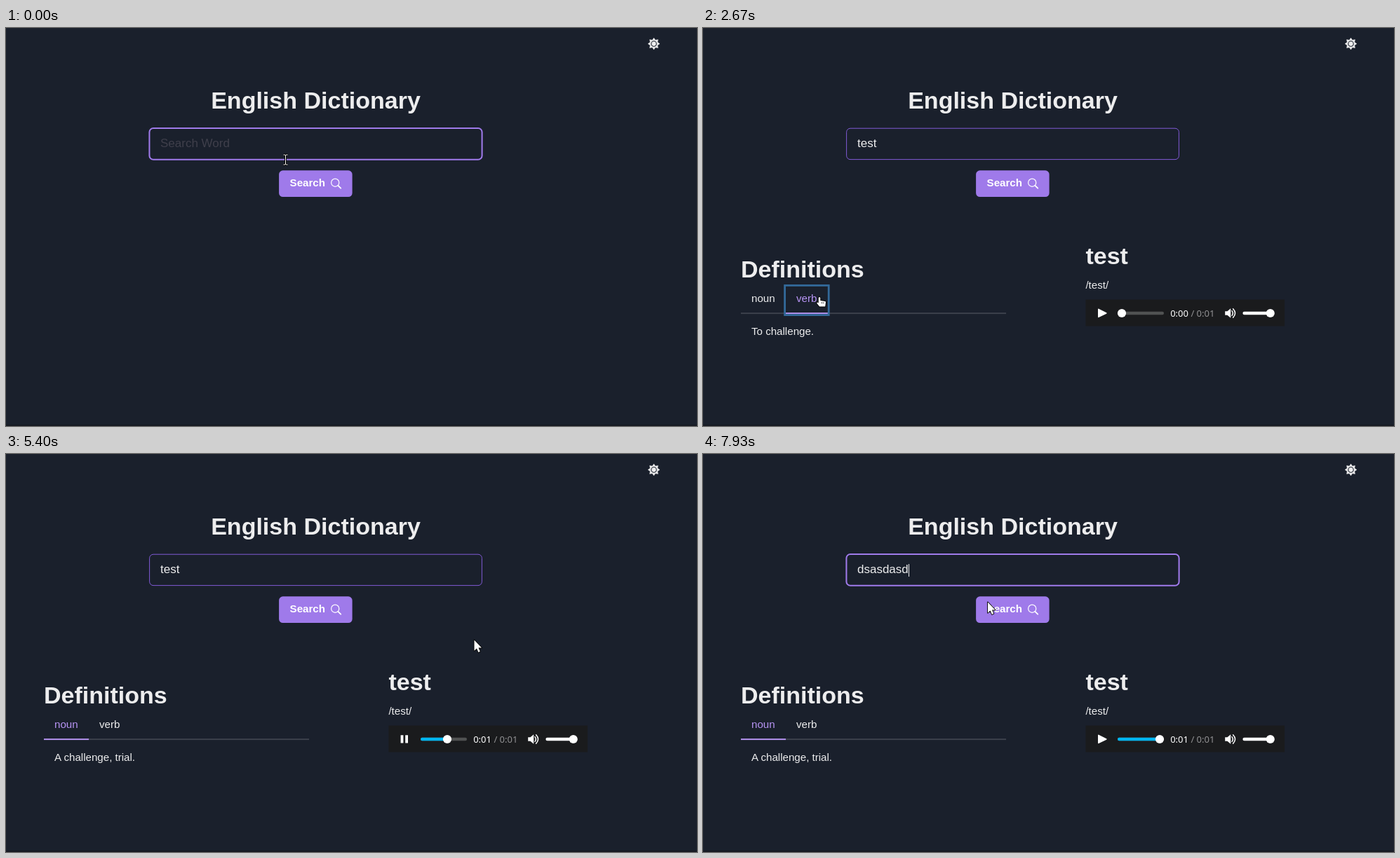
An HTML page for the animation above (8000 ms loop, 985 by 568 pixels).

```html
<!DOCTYPE html>
<html lang="en">
<head>
<meta charset="utf-8">
<title>English Dictionary</title>
<style>
  html, body { margin: 0; width: 100%; height: 100%; overflow: hidden; background: #1a202c; }
  svg { display: block; width: 100%; height: 100%; }
  text { font: 15.12px "Liberation Sans", Arial, sans-serif; fill: #ededee; white-space: pre; }
  .heading { font-size: 34.02px; font-weight: 700; }
  .field { font-size: 17.01px; }
  .clock { font: 13px "Noto Sans", "Open Sans", sans-serif; fill: #fff; }
  .clock.total { fill: #919193; }
  .bold { font-weight: 700; fill: #fff; }
  #placeholder { fill: #3f3f4b; }
  .ring { fill: none; stroke: #326999; stroke-width: 2.8; }
</style>
</head>
<body>
<svg viewBox="0 0 985 568">
  <defs>
    <g id="arrow">
      <path d="M0 0V15.2L3.5 12 5.9 17.4 8.3 16.3 6 11.1H10.5Z" fill="#fff" stroke="#000" stroke-width="1.8" stroke-linejoin="round" paint-order="stroke"/>
    </g>
    <g id="beam" fill="none">
      <path id="stem" d="M-3-7H-1.2Q0-7 0-6V6Q0 7-1.2 7H-3M3-7H1.2Q0-7 0-6M0 6Q0 7 1.2 7H3" stroke="#000" stroke-width="3"/>
      <path d="M-3-7H-1.2Q0-7 0-6V6Q0 7-1.2 7H-3M3-7H1.2Q0-7 0-6M0 6Q0 7 1.2 7H3" stroke="#fff"/>
    </g>
    <g id="hand">
      <path d="M-1.3 1Q0-.8 1.3 1V5L8 6Q9.2 6.3 9 7.8L8.2 13.5H0L-3.6 9Q-4.2 7.5-2.8 7.4L-1.3 8.6Z" fill="#fff" stroke="#000" stroke-width="1.8" stroke-linejoin="round" paint-order="stroke"/>
      <path d="M3.4 7V9.4M5.7 7.2V9.4" stroke="#000" stroke-width=".7"/>
    </g>
  </defs>

  <rect width="985" height="568" fill="#1a202c"/>
  <rect y="566" width="985" height="2" fill="#161a22"/>

  <g transform="translate(923.5 22.5)" fill="#ededee">
    <path id="rays" stroke="#ededee" stroke-width=".6" stroke-linejoin="round"/>
    <circle r="3.7" fill="none" stroke="#1a202c" stroke-width="1.1"/>
  </g>

  <text class="heading" x="441.5" y="114.9" text-anchor="middle">English Dictionary</text>
  <rect id="border" x="204.6" y="143.2" width="473.8" height="44.4" rx="5.4" fill="none" stroke-width="1"/>
  <rect id="glow" x="204.4" y="143" width="474.2" height="44.8" rx="5.6" fill="none" stroke="#9f7aea" stroke-width="2"/>
  <rect id="selection" y="156.5" height="18.5" fill="#3584e4"/>
  <text id="placeholder" class="field" x="220" y="169.6">Search Word</text>
  <text id="query" class="field" x="220" y="169.6"></text>
  <rect id="caret" y="157" width="1" height="18" fill="#ededee"/>

  <rect x="389.1" y="203.3" width="104.5" height="37.8" rx="5.6" fill="#9f7aea"/>
  <text class="bold" x="404.6" y="226">Search</text>
  <g fill="none" stroke="#fff">
    <circle cx="469.2" cy="220.7" r="5.6" stroke-width="1.2"/>
    <path d="M473.4 224.9L477.2 228.7" stroke-width="1.8" stroke-linecap="round"/>
  </g>

  <g id="results">
    <text class="heading" x="54" y="355.8">Definitions</text>
    <rect x="54" y="406.2" width="378" height="1.9" fill="#3e424d"/>
    <rect id="nounLine" x="54" y="406.2" width="64" height="1.9" fill="#b794f4"/>
    <rect id="verbLine" x="118" y="406.2" width="60" height="1.9" fill="#b794f4"/>
    <text id="nounTab" x="69" y="391">noun</text>
    <text id="verbTab" x="133" y="391">verb</text>
    <rect id="nounRing" class="ring" x="52.6" y="367.4" width="66.6" height="42.2"/>
    <rect id="verbRing" class="ring" x="116.6" y="367.4" width="62.6" height="42.2"/>
    <text id="meaning" x="69" y="438.4"></text>

    <text class="heading" x="545.4" y="337">test</text>
    <text x="545.4" y="372">/test/</text>
    <rect x="545.5" y="387.6" width="283.5" height="37.8" fill="#1a1b1d"/>
    <g id="player" fill="#fff">
      <path id="play" d="M563.8 401.4L574.8 407 563.8 412.4Z" stroke-width="1.6" stroke-linejoin="round"/>
      <path id="pause" d="M562.6 401.2h3.8v11.2h-3.8zM569.2 401.2h3.8v11.2h-3.8z"/>
      <rect x="591" y="404.8" width="66" height="4.4" rx="2.2" fill="#505252"/>
      <rect id="progress" x="591" y="404.8" height="4.4" rx="2.2" fill="#00b6f0"/>
      <circle id="thumb" cy="407" r="6.1"/>
      <text id="elapsed" class="clock" x="666.2" y="411.8"></text>
      <text id="total" class="clock total" x="695.4" y="411.8">/ 0:01</text>
      <path d="M744.2 404.2h3.2l4.8-4v13.6l-4.8-4h-3.2z"/>
      <path d="M754 403.6q2.6 3.4 0 6.8M755.6 400.8q5.8 6.2 0 12.4" fill="none" stroke="#fff" stroke-width="1.5" stroke-linecap="round"/>
      <rect x="769.4" y="404.8" width="44" height="4.4" rx="2.2"/>
      <circle cx="808.7" cy="407" r="6.1"/>
    </g>
  </g>
  <use id="pointer"/>
</svg>
<script>
const LOOP = 8000;
const ui = {};
document.querySelectorAll('[id]').forEach(node => ui[node.id] = node);

// Held steps: [start, value...]
const POINTER = [
  [0, 'beam', 398.5, 188],
  [1800, 'arrow', 342, 226], [1865, 'arrow', 245, 290], [1930, 'arrow', 189, 325],
  [2065, 'arrow', 163, 355], [2130, 'hand', 160, 377], [2265, 'hand', 166, 384],
  [2800, 'hand', 158, 384], [2930, 'hand', 135, 385], [3000, 'hand', 112, 385],
  [3065, 'hand', 100, 386], [3200, 'hand', 96, 386],
  [3865, 'arrow', 230, 392], [3930, 'arrow', 400, 396], [4000, 'arrow', 530, 400],
  [4065, 'arrow', 566.5, 402],
  [5065, 'arrow', 574, 392], [5130, 'arrow', 590, 362], [5200, 'arrow', 612, 330],
  [5265, 'arrow', 640, 295], [5330, 'arrow', 660, 273], [5395, 'arrow', 667.5, 265.5],
  [5530, 'arrow', 680, 256], [5665, 'arrow', 688, 250], [5800, 'arrow', 690, 248],
  [5930, 'arrow', 672, 205], [6000, 'beam', 655, 178], [6130, 'beam', 642, 164],
  [6330, 'arrow', 710, 146], [6395, 'arrow', 776, 111], [6465, 'arrow', 690, 146],
  [6530, 'beam', 420, 160], [6665, 'beam', 290, 165], [6730, 'beam', 256, 166],
  [6865, 'beam', 240, 168], [6930, 'beam', 200, 178], [7000, 'beam', 152, 192],
  [7065, 'beam', 124, 203], [7130, 'beam', 161, 203],
  [7665, 'arrow', 215, 205], [7730, 'arrow', 285, 210], [7800, 'arrow', 355, 212],
  [7925, 'arrow', 406, 211.5]
];
const QUERY = [
  [0, ''], [195, 't'], [265, 'te'], [465, 'tes'], [665, 'test'],
  [7595, 'd'], [7665, 'dsa'], [7730, 'dsas'], [7800, 'dsasda'], [7925, 'dsasdasd']
];
const THUMB = [[0, 597], [4865, 609], [5130, 619], [5395, 629], [5665, 640], [5930, 651]];

// Eased ramps: [time, amount]
const FOCUS = [[0, 1], [2430, 1], [2620, 0], [6850, 0], [7020, 1]];
const HOVER = [[5900, 0], [6100, 1], [6340, 1], [6400, .8], [6470, .55], [6530, .65], [6730, 1], [6850, 1], [6950, 0]];
const VERB = [[2430, 0], [2620, 1], [3440, 1], [3630, 0]];
const NOUN = [[1000, 0], [1190, 1], [2430, 1], [2620, 0], [3440, 0], [3630, 1]];
const VERB_RING = VERB;
const NOUN_RING = [[3440, 0], [3630, 1], [4380, 1], [4540, 0]];
const PLAYER = [[1000, 0], [1260, 1]];

const held = (steps, t) => steps.findLast(step => step[0] <= t);
const within = (t, from, to) => t >= from && t < to;
const show = (node, on) => node.style.visibility = on ? 'inherit' : 'hidden';

function ramp(steps, t) {
  const next = steps.findIndex(step => step[0] > t);
  if (next === 0) return steps[0][1];
  if (next < 0) return steps.at(-1)[1];
  const [t0, a] = steps[next - 1], [t1, b] = steps[next];
  return a + (b - a) * (t - t0) / (t1 - t0);
}

function mix(from, to, amount) {
  return `rgb(${from.map((c, i) => Math.round(c + (to[i] - c) * amount))})`;
}

function set(node, attributes) {
  for (const name in attributes) node.setAttribute(name, attributes[name]);
}

function drawInput(t) {
  const [, text] = held(QUERY, t);
  ui.query.textContent = text;
  show(ui.placeholder, !text);
  const end = text ? 220 + ui.query.getComputedTextLength() : 220;
  set(ui.caret, { x: Math.round(end) });
  show(ui.caret, within(t, 195, 1330) || t >= 7595);

  const left = t < 6925 ? 234 : 220;
  set(ui.selection, { x: left, width: Math.max(0, end - left) });
  show(ui.selection, within(t, 6865, 7595));

  set(ui.border, { stroke: mix([128, 90, 213], [78, 80, 96], ramp(HOVER, t)) });
  set(ui.glow, { opacity: ramp(FOCUS, t) });
}

function drawTab(name, selected, ring) {
  set(ui[name + 'Line'], { opacity: selected });
  set(ui[name + 'Ring'], { opacity: ring });
  ui[name + 'Tab'].style.fill = mix([237, 237, 238], [183, 148, 244], selected);
}

function drawPlayer(t) {
  const playing = within(t, 4465, 5995);
  const tint = within(t, 4065, 5065) ? '#48a0f7' : '#fff';
  show(ui.play, !playing);
  show(ui.pause, playing);
  set(ui.play, { fill: tint, stroke: tint });
  set(ui.pause, { fill: tint });
  const [, x] = held(THUMB, t);
  set(ui.thumb, { cx: x });
  set(ui.progress, { width: x > 597 ? x - 591 : 0 });
  ui.elapsed.textContent = t < 5130 ? '0:00' : '0:01';
  show(ui.total, t >= 1330);
  set(ui.player, { opacity: ramp(PLAYER, t) });
}

function draw(t) {
  drawInput(t);
  show(ui.results, t >= 995);
  drawTab('noun', ramp(NOUN, t), ramp(NOUN_RING, t));
  drawTab('verb', ramp(VERB, t), ramp(VERB_RING, t));
  ui.meaning.textContent = within(t, 2465, 3465) ? 'To challenge.' : 'A challenge, trial.';
  drawPlayer(t);
  const [, shape, x, y] = held(POINTER, t);
  set(ui.pointer, { href: '#' + shape, x, y });
}

const rays = Array.from({ length: 16 }, (_, i) => {
  const radius = i % 2 ? 5.6 : 8.3, angle = i * Math.PI / 8;
  return [radius * Math.cos(angle), radius * Math.sin(angle)].map(v => v.toFixed(2));
});
set(ui.rays, { d: `M${rays.join('L')}Z` });

const start = performance.now();
function tick() {
  draw((performance.now() - start) % LOOP);
  requestAnimationFrame(tick);
}
tick();
</script>
</body>
</html>
```
